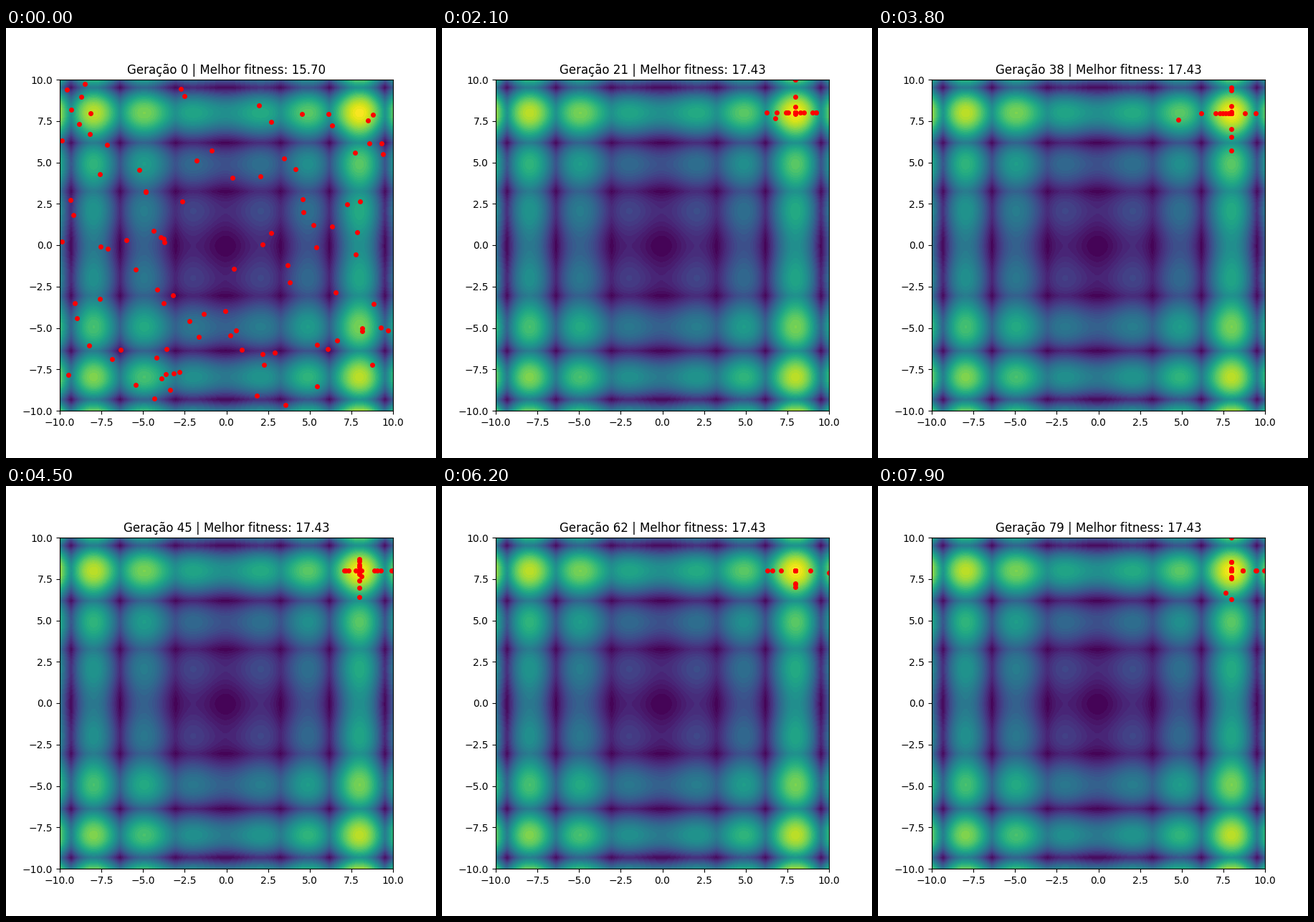
Recreate the animation shown at these times as a matplotlib script. Size 600 by 600 pixels, loop 8000 ms.

```python
import numpy as np
import matplotlib.pyplot as plt
from matplotlib.animation import FuncAnimation

LIMIT = 10
POP_SIZE = 100
GENERATIONS = 80
MUTATION_RATE = 0.08
MUTATION_STEP = 1.0
TOURNAMENT = 5


def alpine(x, y):
    return np.abs(x * np.sin(x) + 0.1 * x) + np.abs(y * np.sin(y) + 0.1 * y)


def fitness(pop):
    return alpine(pop[:, 0], pop[:, 1])


def select(pop, fit):
    """Tournament selection of a whole parent pool."""
    rivals = np.random.randint(POP_SIZE, size=(POP_SIZE, TOURNAMENT))
    winners = rivals[np.arange(POP_SIZE), fit[rivals].argmax(axis=1)]
    return pop[winners]


def next_generation(pop):
    """Swap genes between parents, mutate a few, keep the best individual."""
    fit = fitness(pop)
    mothers, fathers = select(pop, fit), select(pop, fit)
    children = np.where(np.random.rand(POP_SIZE, 2) < 0.5, mothers, fathers)
    mutate = np.random.rand(POP_SIZE, 2) < MUTATION_RATE
    children = children + mutate * np.random.normal(0, MUTATION_STEP, children.shape)
    children[0] = pop[fit.argmax()]
    return np.clip(children, -LIMIT, LIMIT)


def evolve():
    np.random.seed(42)
    history = [np.random.uniform(-LIMIT, LIMIT, (POP_SIZE, 2))]
    while len(history) < GENERATIONS:
        history.append(next_generation(history[-1]))
    return history


history = evolve()

fig, ax = plt.subplots(figsize=(6, 6), dpi=100)
axis = np.linspace(-LIMIT, LIMIT, 200)
X, Y = np.meshgrid(axis, axis)
ax.contourf(X, Y, alpine(X, Y), levels=50, cmap="viridis")
ax.set_xlim(-LIMIT, LIMIT)
ax.set_ylim(-LIMIT, LIMIT)
dots, = ax.plot([], [], "o", color="red", markersize=4)
title = ax.set_title("")


def update(gen):
    pop = history[gen]
    dots.set_data(pop[:, 0], pop[:, 1])
    title.set_text(f"Geração {gen} | Melhor fitness: {fitness(pop).max():.2f}")
    return dots, title


anim = FuncAnimation(fig, update, frames=GENERATIONS, interval=100,
                     repeat=True, repeat_delay=0)
plt.show()
```
